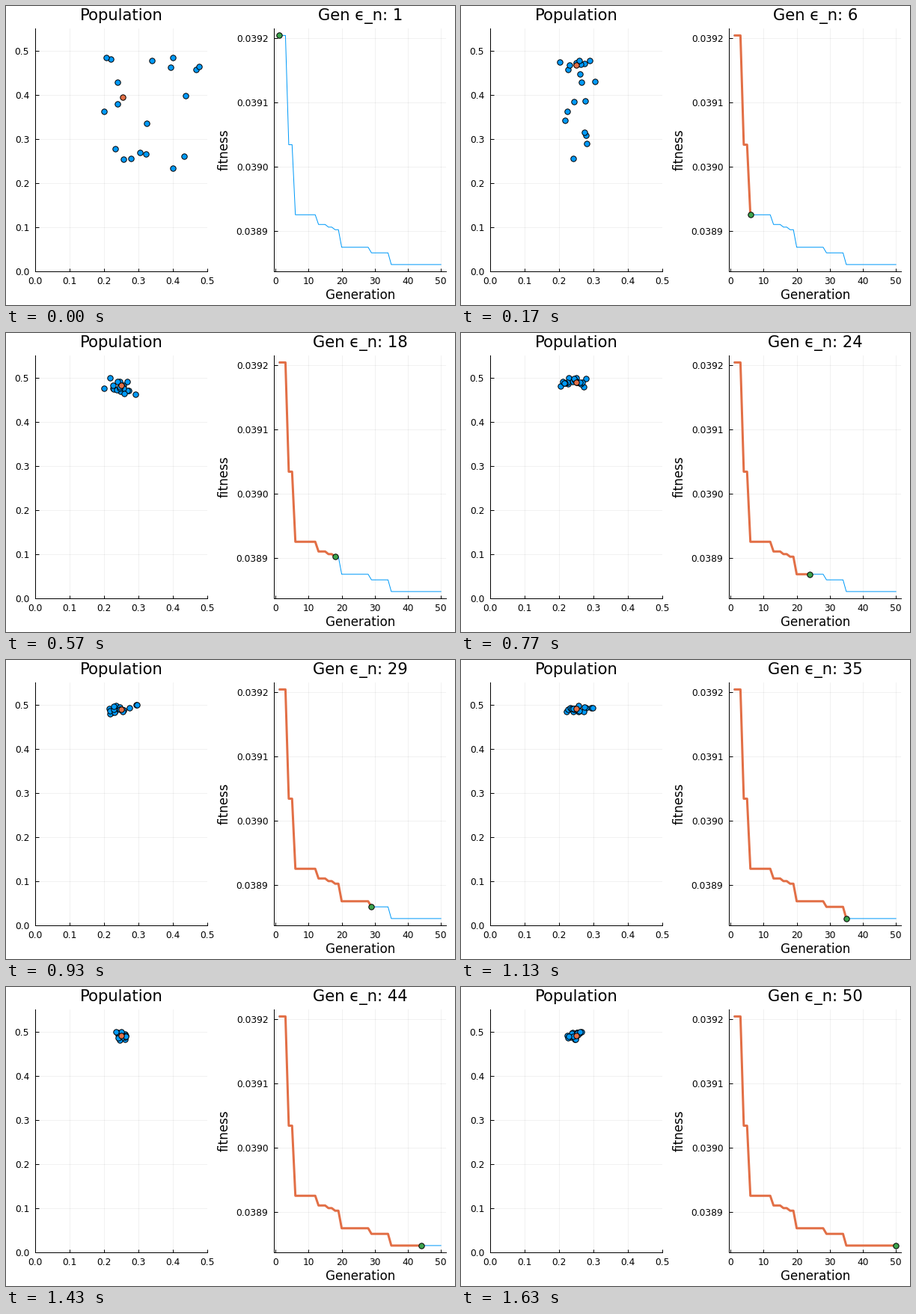
Animation, 600 px wide and 400 px high, one loop 1660 ms. Source, as a matplotlib script:

```python
import numpy as np
import matplotlib.pyplot as plt
from matplotlib.animation import FuncAnimation

W, H, DPI = 600, 400, 100
PX = 72 / DPI                      # one pixel in points
BLUE, ORANGE, GREEN = "#009AF9", "#E26F46", "#3DA44D"
GENS, SIZE = 50, 20
TICK, LOOP = 10, 1660              # ms
TOP, BOTTOM = 30.2, 355.1          # plot area, px from the top
LOW, HIGH = 0.2, 0.5               # search bounds

plt.rcParams["font.family"] = "DejaVu Sans"

# generation of each improvement: fitness, height of the best individual
STEPS = {
    1: (0.0392038, 0.394),
    4: (0.0390340, 0.436),
    6: (0.0389251, 0.467),
    13: (0.0389100, 0.474),
    16: (0.0389059, 0.478),
    18: (0.0389019, 0.482),
    20: (0.0388746, 0.490),
    29: (0.0388659, 0.490),
    35: (0.0388477, 0.491),
}


def step(gen):
    return STEPS[max(g for g in STEPS if g <= gen)]


def best_at(gen):
    y = step(gen)[1]
    return 0.25 + 0.04 * (0.491 - y), y


def evolve(seed):
    """Each generation redraws a fifth of the swarm, ever closer to the best."""
    rng = np.random.default_rng(seed)
    pop = rng.uniform(LOW, HIGH, (SIZE, 2))
    history = [pop]
    for gen in range(2, GENS + 1):
        spread = (0.034 * (1 - gen / 75),
                  0.005 + 0.03 * np.exp((6 - gen) / 5))
        fresh = rng.normal(best_at(gen), spread, (SIZE, 2)).clip(LOW, HIGH)
        redrawn = (np.arange(SIZE) + gen) % 5 == 0
        pop = np.where(redrawn[:, None], fresh, pop)
        history.append(pop)
    return history


fig = plt.figure(figsize=(W / DPI, H / DPI), dpi=DPI, facecolor="white")


def label(x, y, s, size, **kw):
    kw = {"ha": "center", "va": "baseline", **kw}
    return fig.text(x / W, 1 - y / H, s, fontsize=size * PX, **kw)


def panel(left, right, xlim, ylim, xticks, yticks, xfmt, yfmt):
    ax = fig.add_axes([left / W, 1 - BOTTOM / H,
                       (right - left) / W, (BOTTOM - TOP) / H])
    ax.set(xlim=xlim, ylim=ylim, xticks=xticks, yticks=yticks)
    ax.set_axisbelow(True)
    ax.grid(color="black", alpha=0.08, lw=0.5)
    ax.spines[["top", "right"]].set_visible(False)
    ax.spines[["left", "bottom"]].set_linewidth(PX)
    ax.tick_params(direction="in", length=4.5 * PX, width=PX,
                   labelbottom=False, labelleft=False)
    for v in xticks:
        x = left + (v - xlim[0]) / (xlim[1] - xlim[0]) * (right - left)
        label(x, 371.8, format(v, xfmt), 12.2)
    for v in yticks:
        y = BOTTOM - (v - ylim[0]) / (ylim[1] - ylim[0]) * (BOTTOM - TOP)
        label(left - 7.6, y + 5, format(v, yfmt), 12.2, ha="right")
    return ax


def dots(ax, color):
    return ax.plot([], [], "o", ms=7.4 * PX, mfc=color, mec="black",
                   mew=PX, clip_on=False, zorder=4)[0]


gens = np.arange(1, GENS + 1)
fitness = np.array([step(g)[0] for g in gens])
swarm = evolve(seed=12)
pad = 0.03 * np.ptp(fitness)
tenths = np.arange(6) / 10

left_ax = panel(38.8, 268.8, (0, 0.5), (0, 0.55), tenths, tenths,
                ".1f", ".1f")
right_ax = panel(358.1, 587.7, (-0.47, 51.47),
                 (fitness.min() - pad, fitness.max() + pad),
                 range(0, 51, 10), np.arange(389, 393) / 1e4, "d", ".4f")

label(154, 18.8, "Population", 21.1)
title = label(473.3, 18.8, "", 21.1)
label(473.3, 392, "Generation", 16.7)
label(297, 192, "fitness", 16.7, rotation=90, rotation_mode="anchor")

crowd, best = dots(left_ax, BLUE), dots(left_ax, ORANGE)
right_ax.plot(gens, fitness, color=BLUE, lw=PX)
trail, = right_ax.plot([], [], color=ORANGE, lw=3 * PX,
                       solid_capstyle="butt")
marker = dots(right_ax, GREEN)


def draw(frame):
    gen = min(GENS, 1 + round(frame * TICK * GENS / (LOOP + 6.7)))
    x, y = best_at(gen)
    crowd.set_data(*swarm[gen - 1][1:].T)
    best.set_data([x], [y])
    trail.set_data(gens[:gen], fitness[:gen])
    marker.set_data([gen], [fitness[gen - 1]])
    title.set_text(f"Gen \u03f5_n: {gen}")
    return crowd, best, trail, marker, title


anim = FuncAnimation(fig, draw, frames=LOOP // TICK, interval=TICK,
                     init_func=lambda: draw(0), repeat=True, repeat_delay=0)
plt.show()
```
